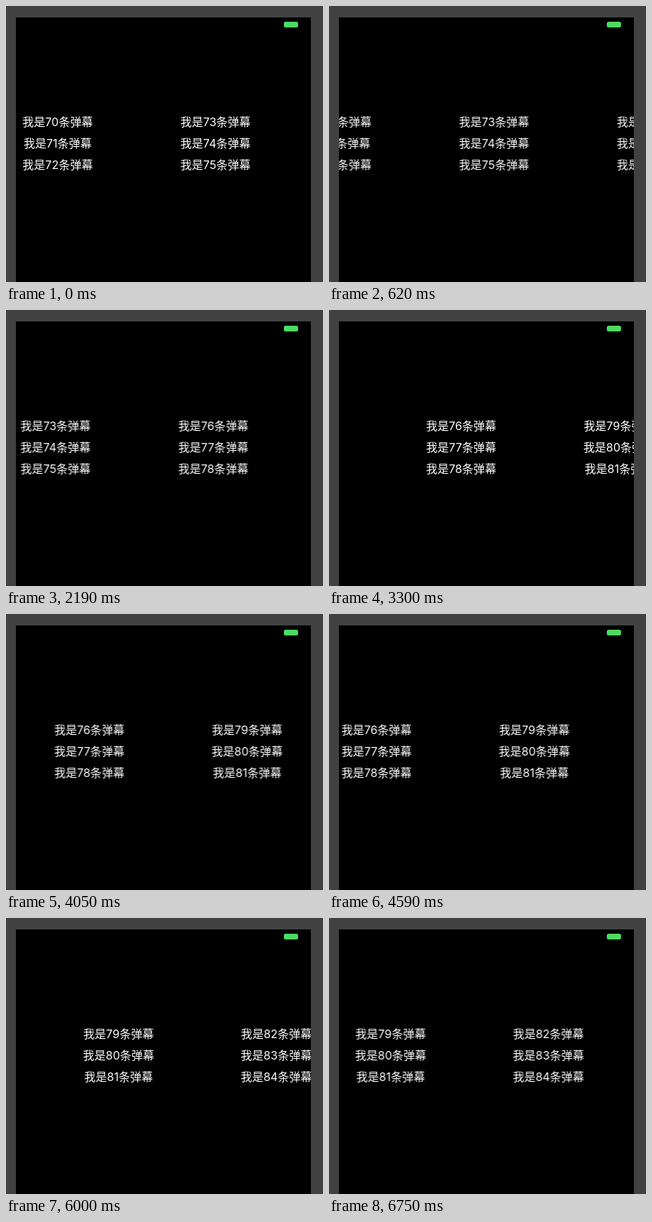
These frames come from a looping animation (445x386 px, 6770 ms). An HTML page:

```html
<!DOCTYPE html>
<html lang="zh-CN">
<head>
<meta charset="utf-8">
<title>弹幕</title>
<style>
  html, body {
    margin: 0;
    width: 100%;
    height: 100%;
    overflow: hidden;
    background: #414141;
  }
  svg { display: block; overflow: hidden; }
  text {
    font: 400 16px Inter, "Noto Sans CJK SC", "Noto Sans CJK", sans-serif;
    fill: #fff;
    text-anchor: middle;
  }
  #track { animation: drift 6770ms infinite; }

  /* Small steps follow the screen's refresh; the pace drops after 2.8 s. */
  @keyframes drift {
    0%      { transform: translateX(0);        animation-timing-function: steps(45); }
    18.463% { transform: translateX(-127.5px); animation-timing-function: steps(35); }
    32.348% { transform: translateX(-224.5px); animation-timing-function: steps(21); }
    41.063% { transform: translateX(-282px);   animation-timing-function: steps(16); }
    48.744% { transform: translateX(-330px);   animation-timing-function: steps(25); }
    59.822% { transform: translateX(-398.5px); animation-timing-function: steps(35); }
    76.218% { transform: translateX(-502px);   animation-timing-function: steps(52); }
    99.704%, 100% { transform: translateX(-650.5px); }
  }
</style>
</head>
<body>
<svg width="445" height="386">
  <svg x="14" y="16" width="414" height="370" viewBox="14 16 414 370">
    <rect x="14" y="16" width="414" height="370" fill="#000"/>
    <rect x="390" y="22" width="20" height="8" rx="2.5" fill="#4cd964"/>
    <g id="track"></g>
  </svg>
</svg>
<script>
  const track = document.getElementById('track');
  const first = 70, count = 15, rows = 3;
  const startX = 72.5, gapX = 221.5, baseY = 168, gapY = 30;

  for (let i = 0; i < count; i++) {
    const label = document.createElementNS('http://www.w3.org/2000/svg', 'text');
    label.setAttribute('x', startX + gapX * Math.floor(i / rows));
    label.setAttribute('y', baseY + gapY * (i % rows));
    label.textContent = `我是${first + i}条弹幕`;
    track.append(label);
  }
</script>
</body>
</html>
```
